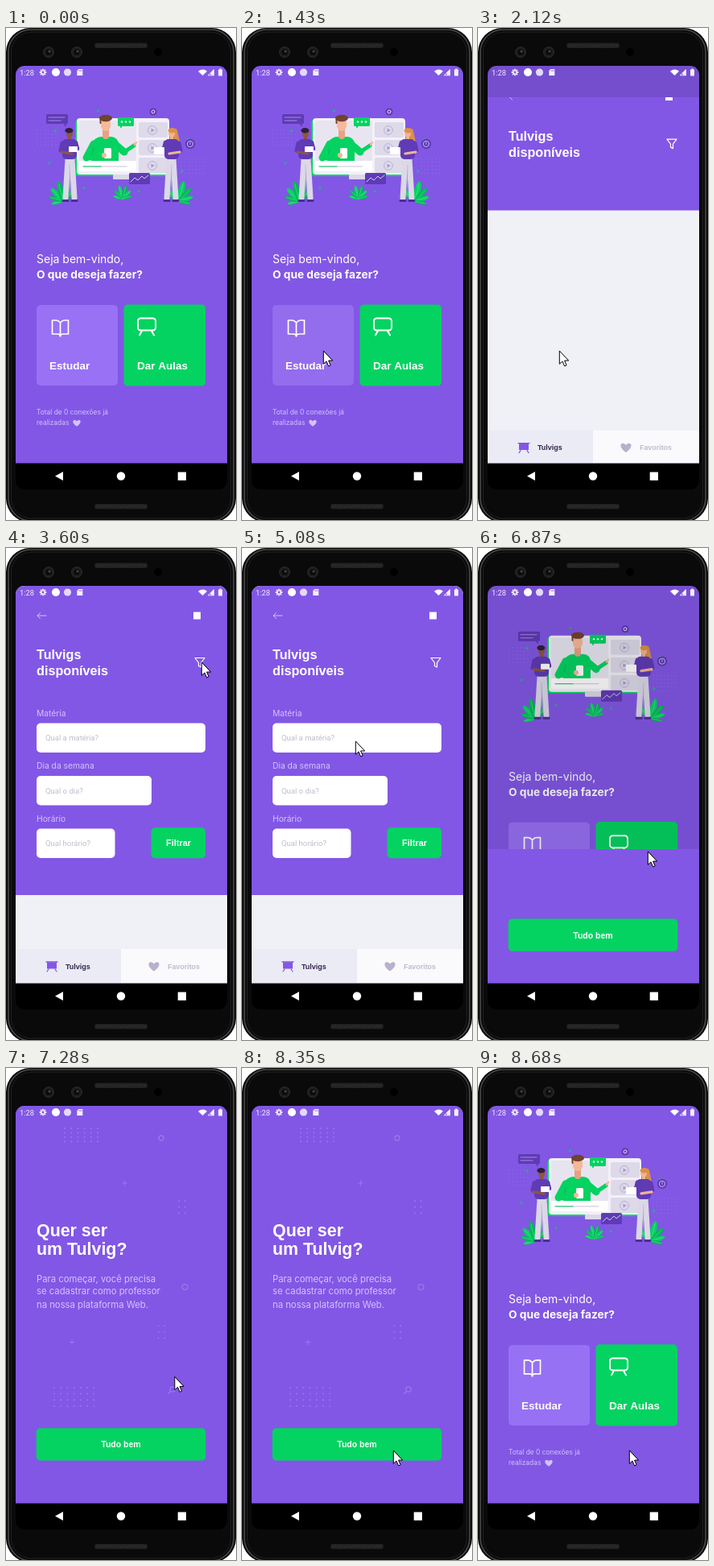
These frames come from a looping animation (286 by 611 pixels, 8.73 s). An HTML page with a canvas:

```html
<!DOCTYPE html>
<html lang="pt">
<head>
<meta charset="utf-8">
<title>Aulas</title>
<style>
html, body { margin: 0; width: 286px; height: 611px; overflow: hidden; background: #fff; }
canvas { display: block; width: 286px; height: 611px; }
</style>
</head>
<body>
<canvas id="stage"></canvas>
<script>
const W = 286, H = 611, LOOP = 8730;
const VIEW = { x: 12, y: 47, w: 263, h: 493.6 };
const PURPLE = '#8257e5', GREEN = '#04d361', LILAC = '#d4c2ff', DEEP = '#5f3bb5';
const TEXT = 'Inter, sans-serif';
const HEAD = '"Liberation Sans", Arial, sans-serif';
const FIELD = 'Roboto, sans-serif';

const canvas = document.getElementById('stage');
const dpr = window.devicePixelRatio || 1;
canvas.width = W * dpr;
canvas.height = H * dpr;
const c = canvas.getContext('2d');

// ---------- drawing helpers ----------
function fill(color) {
  c.fillStyle = color;
  c.fill();
}
function stroke(color, lw) {
  c.strokeStyle = color;
  c.lineWidth = lw;
  c.lineCap = c.lineJoin = 'round';
  c.stroke();
}
function box(x, y, w, h, r) {
  c.beginPath();
  c.roundRect(x, y, w, h, r);
}
function rect(x, y, w, h, r, color) {
  box(x, y, w, h, r);
  fill(color);
}
function frame(x, y, w, h, r, color, lw) {
  box(x, y, w, h, r);
  stroke(color, lw);
}
function oval(x, y, rx, ry, color) {
  c.beginPath();
  c.ellipse(x, y, rx, ry, 0, 0, 7);
  fill(color);
}
const dot = (x, y, r, color) => oval(x, y, r, r, color);
function ring(x, y, r, color, lw) {
  c.beginPath();
  c.arc(x, y, r, 0, 7);
  stroke(color, lw);
}
function bar(x1, y1, x2, y2, color, lw) {
  c.beginPath();
  c.moveTo(x1, y1);
  c.lineTo(x2, y2);
  stroke(color, lw);
}
// svg path data drawn at an offset
function glyph(d, x, y, inside, edge, lw) {
  const path = new Path2D(d);
  c.save();
  c.translate(x, y);
  c.lineCap = c.lineJoin = 'round';
  if (inside) { c.fillStyle = inside; c.fill(path); }
  if (edge) { c.strokeStyle = edge; c.lineWidth = lw; c.stroke(path); }
  c.restore();
}
function text(str, x, y, size, color, family = TEXT, weight = 400, align = 'left') {
  c.font = `${weight} ${size}px ${family}`;
  c.textAlign = align;
  c.fillStyle = color;
  c.fillText(str, x, y);
}
const title = (str, x, y, size, color = '#fff', align) => text(str, x, y, size, color, HEAD, 700, align);
function grid(x, y, cols, rows, dx, dy, r, color) {
  for (let i = 0; i < cols; i++)
    for (let j = 0; j < rows; j++) dot(x + i * dx, y + j * dy, r, color);
}
function plus(x, y, r, color) {
  bar(x - r, y, x + r, y, color, 1);
  bar(x, y - r, x, y + r, color, 1);
}
function heart(x, y, s, color) {
  c.save();
  c.translate(x, y);
  c.scale(s, s);
  glyph('M0 1C-2-.3-.8-1.5 0-.5C.8-1.5 2-.3 0 1', 0, 0, color);
  c.restore();
}
function plant(x, y, size, n, lean) {
  for (let i = 0; i < n; i++) {
    const a = (i / (n - 1) - .5) * 2.6 + lean;
    const len = size * (1 - .25 * Math.abs(a));
    c.save();
    c.translate(x, y);
    c.rotate(a);
    oval(0, -len / 2, len * .15, len / 2, i % 2 ? '#05b85a' : GREEN);
    bar(0, 0, 0, -len * .85, '#7ff0b0', .4);
    c.restore();
  }
}

// ---------- timing ----------
const clamp = v => Math.min(1, Math.max(0, v));
const smooth = k => k * k * (3 - 2 * k);
const bez = (s, a, b) => 3 * (1 - s) * (1 - s) * s * a + 3 * (1 - s) * s * s * b + s * s * s;
function ease(k) {
  if (k <= 0 || k >= 1) return clamp(k);
  let lo = 0, hi = 1;
  for (let i = 0; i < 24; i++) {
    const mid = (lo + hi) / 2;
    if (bez(mid, .20833, .25) < k) lo = mid; else hi = mid;
  }
  return bez(lo, .82, 1);
}
const sheet = (t, open, close) =>
  t < close ? ease((t - open) / 425) : 1 - ease((t - close) / 425);

// start, end, x and y reached by the pointer tip
const MOVES = [
  [310, 640, 112, 311], [640, 820, 101, 401], [2330, 2730, 184, 158], [2750, 2960, 243, 142],
  [3860, 4340, 141, 240], [5400, 5760, 214, 381], [5770, 5900, 211, 377], [7220, 7610, 188, 475]
];
function pointer(t) {
  let x = 217, y = 600;
  for (const [from, to, mx, my] of MOVES) {
    const k = smooth(clamp((t - from) / (to - from)));
    x += (mx - x) * k;
    y += (my - y) * k;
  }
  return [x, y];
}

// touch feedback growing from the pressed point inside a rounded box
function ripple(t, from, to, px, py, x, y, w, h) {
  if (t < from || t > to + 200) return;
  const k = clamp((t - from) / 240), out = 1 - clamp((t - to) / 200);
  c.save();
  box(x, y, w, h, 5);
  c.clip();
  dot(px, py, 15 + k * Math.hypot(w, h), `rgba(0,0,0,${.03 * out})`);
  c.restore();
}

// ---------- home ----------
// side is the direction the person faces
function person(x, side, skin, hair) {
  const pants = '#dcd8e8';
  bar(x - side * 2, 163, x - side * 5, 211, pants, 7);
  bar(x + side * 3, 163, x + side * 6, 211, pants, 7);
  bar(x, 170, x + side, 208, '#b9b2cf', .7);
  for (const s of [-5, 6]) rect(x + s * side - 4.5, 213, 9, 3, 1.5, '#4a2f91');
  if (side < 0) bar(x + 4, 128, x + 7, 142, hair, 6);
  bar(x, 133, x, 139, skin, 4.5);
  rect(x - 9, 138, 18, 25, 5, DEEP);
  bar(x - side * 9, 143, x - side * 11, 152, DEEP, 5);
  bar(x - side * 10, 154, x + side * 3, 156, skin, 3.2);
  bar(x + side * 8, 142, x + side * 10, 150, DEEP, 4.5);
  oval(x, 131, 4, 5, skin);
  oval(x - side * .6, 127.3, 5, 3.2, hair);
}

function teacher() {
  const skin = '#f6b899';
  rect(106, 135, 34, 30, [13, 9, 0, 0], GREEN);
  bar(109, 144, 100, 161, GREEN, 9);
  bar(100, 161, 122, 160, GREEN, 7);
  bar(134, 143, 147, 154, GREEN, 9);
  bar(147, 154, 159, 146, GREEN, 5);
  bar(109, 149, 107, 157, '#06b757', 1);
  bar(160, 145, 162, 142, skin, 2.5);
  bar(124, 128, 124, 134, '#e9a184', 8);
  oval(124, 120, 6.2, 8.2, skin);
  oval(124, 112, 8, 4.2, '#70432e');
  bar(117.5, 113, 117.5, 118, '#70432e', 2);
  rect(122, 149, 9, 13, 1.5, '#fff');
  dot(122, 158, 3, skin);
}

function art() {
  const faint = 'rgba(190,165,255,.35)';
  grid(39, 127, 6, 5, 4.6, 4.6, .55, faint);
  grid(218, 162, 7, 5, 4.6, 4.6, .55, faint);
  plant(71, 215, 27, 6, -.5);
  plant(215, 215, 27, 6, .5);
  plant(145, 212, 18, 6, 0);
  for (let i = 0; i < 8; i++) {
    const a = i * Math.PI / 4 + .5;
    ring(140 + Math.cos(a) * 90, 153 + Math.sin(a) * 52, 1.1, GREEN, .9);
  }

  // monitor
  rect(86, 114, 116, 70, 4, GREEN);
  rect(88, 112, 115, 70, 4, '#f3f1f8');
  rect(91, 115, 71, 63, 2, '#e8e5f1');
  rect(91, 165, 71, 13, 0, '#fff');
  bar(96, 172, 150, 172, '#c9c3dc', 1);
  bar(96, 172, 118, 172, GREEN, 1);
  rect(133, 182, 25, 6, 1, '#dcd8e8');
  for (let y = 127; y < 180; y += 22) {
    rect(165, y - 10, 36, 19, 2, '#dedaea');
    ring(182, y, 5.4, '#b8b0d4', 1);
    glyph('M-1.5-2.5L2.8 0L-1.5 2.5Z', 182, y, '#a79dc8');
  }
  teacher();

  // speech bubble and floating panels
  rect(139, 111, 20, 11, 1.5, GREEN);
  bar(143, 121, 143, 123, GREEN, 2);
  grid(144, 116.5, 3, 1, 5, 1, 1.2, '#fff');
  rect(50, 107, 27, 12, 1.5, DEEP);
  bar(73, 119, 74, 121, DEEP, 2);
  bar(53, 111, 73, 111, '#a88be8', 1);
  bar(53, 115, 68, 115, '#a88be8', 1);
  rect(153, 180, 26, 14, 1.5, DEEP);
  glyph('M2 11l5-5l4 3l5-5l3 3l5-4', 153, 180, null, '#e6dcff', .9);
  dot(183, 104, 4.6, DEEP);
  ring(183, 104, 2, '#e6dcff', 1);
  dot(229, 144, 6.2, DEEP);
  ring(229, 144, 3.6, LILAC, .9);
  bar(229, 142, 229, 144.5, LILAC, .8);

  person(79, 1, '#8d5640', '#2d2038');
  rect(78, 147, 11, 7, 1, '#fff');
  person(206, -1, '#f3b396', '#dc9146');
  rect(184, 148, 13, 9, 1, '#fff');
}

function home(t) {
  rect(VIEW.x, VIEW.y, VIEW.w, VIEW.h + 12, 0, PURPLE);
  art();
  text('Seja bem-vindo,', 38, 292, 14, '#fff');
  text('O que deseja fazer?', 38, 311, 13.7, '#fff', TEXT, 700);
  rect(38, 344, 101, 100, 5, '#9871f5');
  rect(146.5, 343.4, 101.5, 101.2, 5, GREEN);
  ripple(t, 1190, 1930, 102, 402, 38, 344, 101, 100);
  ripple(t, 6000, 6450, 211, 378, 146.5, 343.4, 101.5, 101.2);
  glyph('M0 3Q-2.5 0-5 0H-10V17H-4Q0 17 0 20Q0 17 4 17H10V0H5Q2.5 0 0 3V20', 67.5, 363, null, '#fff', 1.7);
  frame(164, 360.5, 22, 15, 3.5, '#fff', 2);
  for (const s of [-1, 1]) bar(175 + s * 6, 376, 175 + s * 9, 381.5, '#fff', 2);
  title('Estudar', 54, 424, 13.5);
  title('Dar Aulas', 163, 424, 13.5);
  text('Total de 0 conexões já', 38, 480, 8.4, LILAC);
  text('realizadas', 38, 493, 8.4, LILAC);
  heart(88, 490.5, 4.3, LILAC);
}

// ---------- study ----------
function field(label, hint, y, w) {
  text(label, 38, y - 9, 10.3, LILAC);
  rect(38, y, w, 36.5, 5, '#fff');
  text(hint, 49, y + 21.7, 9.5, '#c1bccc', FIELD);
}

function study(t) {
  const open = t >= 3420;
  rect(12, 47, 263, 494, 0, '#f0f0f7');
  rect(12, 47, 263, open ? 384 : 178, 0, PURPLE);
  glyph('M11 0H0L3.5-3.5M0 0L3.5 3.5', 39, 84, null, LILAC, 1);
  rect(233, 79.5, 9, 9, 0, '#fff');
  title('Tulvigs', 38, 138, 16.2);
  title('disponíveis', 38, 158, 16.2);
  glyph('M-6-5.5H6L1.5 .5V6L-1.5 4.5V.5Z', 241, 142, null, '#fff', 1.2);
  ripple(t, 3110, 3400, 241, 142, 229, 130, 24, 24);

  if (open) {
    field('Matéria', 'Qual a matéria?', 217.5, 210);
    field('Dia da semana', 'Qual o dia?', 283, 143);
    field('Horário', 'Qual horário?', 348.5, 97.5);
    rect(180.5, 347.3, 67.5, 38, 5, GREEN);
    title('Filtrar', 214.5, 370.3, 10.9, '#fff', 'center');
    if (t >= 4490 && t < 5080) rect(49, 228, 1.5, 14, 0, '#009688');
  }

  // tabs
  rect(12, 498, 131, 43, 0, '#ebebf5');
  rect(143, 498, 132, 43, 0, '#fafafc');
  bar(50, 514, 64, 514, PURPLE, 1.4);
  rect(51, 514.5, 12, 8, 0, PURPLE);
  for (const s of [-1, 1]) bar(57 + s * 4, 523, 57 + s * 6, 526, PURPLE, 1.2);
  title('Tulvigs', 74, 522.5, 9, '#32264d');
  heart(184, 519.5, 6, '#b9b0cc');
  title('Favoritos', 201, 522.5, 8.9, '#c1bccc');
}

// ---------- info ----------
function pattern() {
  const faint = '#9a76ee';
  grid(73, 75, 6, 4, 8.2, 5.4, 1, faint);
  grid(60, 397, 7, 4, 8.2, 7.6, 1, faint);
  grid(215, 165, 2, 3, 7.6, 7.6, 1, faint);
  grid(189.5, 320, 2, 3, 7.6, 7.6, 1, faint);
  ring(193, 87, 3, faint, 1.3);
  ring(222.5, 272, 3.4, faint, 1.3);
  plus(147.5, 143, 3, faint);
  plus(82, 340.5, 3, faint);
  ring(207, 399, 3.2, faint, 1.3);
  bar(204.6, 401.5, 201.8, 404.5, faint, 1.3);
}

function info(t) {
  rect(12, 47, 263, 494, 0, PURPLE);
  if (t > 6910) pattern(); // the backdrop loads a moment after the page
  title('Quer ser', 38, 209, 21.4);
  title('um Tulvig?', 38, 232, 21.4);
  text('Para começar, você precisa', 38, 265.5, 11.3, LILAC);
  text('se cadastrar como professor', 38, 281, 11.3, LILAC);
  text('na nossa plataforma Web.', 38, 298, 11.3, LILAC);
  rect(37.7, 447.2, 210.5, 40.2, 5, GREEN);
  ripple(t, 7890, 8130, 189, 476, 37.7, 447.2, 210.5, 40.2);
  title('Tudo bem', 143, 471.3, 10.5, '#fff', 'center');
}

// ---------- phone ----------
function grille(y) {
  rect(110, y, 66, 6.5, 3, '#1f1f1f');
  for (let x = 112; x < 175; x += 3) bar(x, y + 5, x + 1.5, y + 1.5, '#3c3c3c', .8);
}
function lens(x) {
  dot(x, 30, 7, '#1c1c1c');
  ring(x, 30, 6.3, '#2b2b2b', 1);
  dot(x, 30, 3.6, '#0b0b0b');
  dot(x + 1, 29, 1.5, '#4a4646');
}
function body() {
  rect(0, 0, W, H, 0, '#fff');
  rect(0, 0, W, H + 3, 30, '#0a0a0a');
  frame(3, 2, W - 6, H - 1, 28, '#4a4a4a', 1.6);
  frame(6.5, 5, W - 13, H - 7, 25, '#222', 1);
  grille(18.5);
  grille(591);
  lens(53);
  lens(88);
  dot(189, 30, 5, '#000');
  rect(12, 47, 263, 526, 11, '#000');
  glyph('M-5 0L5-5.5V5.5Z', 66, 556.5, '#fff');
  dot(143, 556.5, 5.2, '#fff');
  rect(213.7, 551.5, 10.3, 10.3, 0, '#fff');
}
function statusBar() {
  const ink = '#f3eefc';
  text('1:28', 17, 58.5, 9.3, ink, FIELD);
  for (let i = 0; i < 4; i++) {
    const x = Math.cos(i * Math.PI / 4) * 3.6, y = Math.sin(i * Math.PI / 4) * 3.6;
    bar(46 - x, 55 - y, 46 + x, 55 + y, ink, 1.8);
  }
  dot(46, 55, 1.4, PURPLE);
  dot(62, 55, 5, '#fff');
  dot(76.5, 55, 4.6, '#e4daf9');
  glyph('M0 2L2 0H7V8H0Z', 88.3, 51, ink);
  for (let x = 91; x < 95; x += 1.6) bar(x, 52.4, x, 53.6, PURPLE, .6);
  c.beginPath();
  c.moveTo(244.5, 59);
  c.arc(244.5, 59, 7.6, -Math.PI * .76, -Math.PI * .24);
  fill('#fff');
  glyph('M0 7L7 0V7Z', 251.5, 51.5, null, ink, .9);
  glyph('M3 4L7 0V7H3Z', 251.5, 51.5, ink);
  rect(264, 51.5, 5, 8, .8, ink);
  rect(265.4, 50.5, 2.2, 2, 0, ink);
}

// the top page is uncovered from below while the lower one slides up and dims
function reveal(t, page, p) {
  if (p <= 0) return;
  rect(VIEW.x, VIEW.y, VIEW.w, VIEW.h, 0, `rgba(0,0,0,${.1 * Math.min(1, p / .36)})`);
  const gap = VIEW.h * (1 - p);
  c.save();
  c.beginPath();
  c.rect(VIEW.x, VIEW.y + gap, VIEW.w, VIEW.h - gap);
  c.clip();
  c.translate(0, gap * .041);
  page(t);
  c.restore();
}

function draw(t) {
  c.setTransform(dpr, 0, 0, dpr, 0, 0);
  body();
  const pStudy = sheet(t, 1930, 5090), pInfo = sheet(t, 6833.5, 8375);
  c.save();
  box(VIEW.x, VIEW.y, VIEW.w, VIEW.h, [11, 11, 0, 0]);
  c.clip();
  c.save();
  c.translate(0, -VIEW.h * .02 * Math.max(pStudy, pInfo));
  home(t);
  c.restore();
  reveal(t, study, pStudy);
  reveal(t, info, pInfo);
  statusBar();
  c.restore();
  if (t >= MOVES[0][0])
    glyph('M.3 .3V16.3L4 12.9L6.6 18.9L9.1 17.8L6.6 12H11.3Z', ...pointer(t), '#fff', '#000', 1);
}

const start = performance.now();
function tick() {
  draw((performance.now() - start) % LOOP);
  requestAnimationFrame(tick);
}
tick();
</script>
</body>
</html>
```
